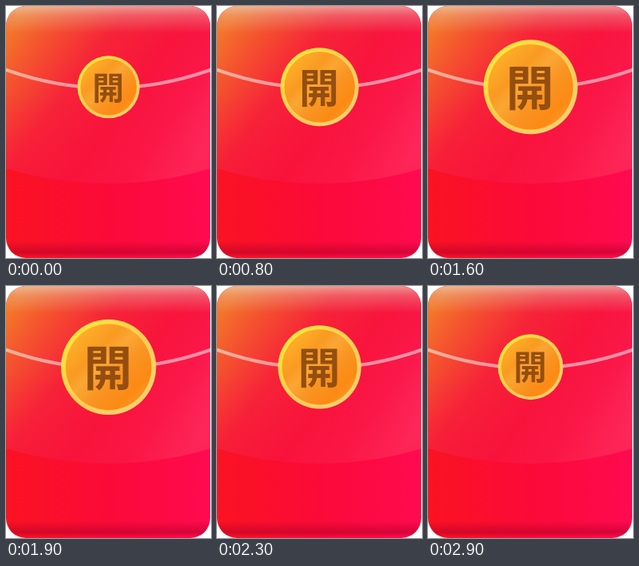
An HTML page for the animation above (3000 ms loop, 257 by 315 pixels).

```html
<!DOCTYPE html>
<html lang="zh-Hant">
<head>
<meta charset="utf-8">
<style>
  html, body { margin: 0; width: 100%; height: 100%; overflow: hidden; background: #fff; }
  svg { display: block; width: 257px; height: 315px; }
  text { font: bold 63px "Noto Sans CJK TC", "Noto Sans CJK JP", "Noto Sans CJK", sans-serif; }
</style>
</head>
<body>
<svg viewBox="0 0 257 315">
  <defs>
    <clipPath id="card"><rect width="256" height="315" rx="25"/></clipPath>
    <path id="flapShape" d="M0 0H257V203Q128.5 241 0 203Z"/>
    <linearGradient id="body">
      <stop stop-color="#fa1322"/>
      <stop offset=".5" stop-color="#fb0a38"/>
      <stop offset="1" stop-color="#ff0a50"/>
    </linearGradient>
    <linearGradient id="flap" gradientUnits="userSpaceOnUse" x1="0" y1="36" x2="230" y2="206">
      <stop stop-color="#f4762a"/>
      <stop offset=".14" stop-color="#f4542e"/>
      <stop offset=".36" stop-color="#f62438"/>
      <stop offset=".6" stop-color="#f8143c"/>
      <stop offset=".8" stop-color="#fb184a"/>
      <stop offset="1" stop-color="#ff2c62"/>
    </linearGradient>
    <linearGradient id="fade" gradientUnits="userSpaceOnUse" x1="0" y1="110" x2="0" y2="222">
      <stop stop-color="#fa1038" stop-opacity="0"/>
      <stop offset="1" stop-color="#fa1038" stop-opacity=".35"/>
    </linearGradient>
    <linearGradient id="top" x2="0" y2="1">
      <stop stop-color="#e8d8c4" stop-opacity=".65"/>
      <stop offset=".35" stop-color="#e8d0bc" stop-opacity=".32"/>
      <stop offset="1" stop-color="#e8c8b4" stop-opacity="0"/>
    </linearGradient>
    <linearGradient id="bottom" x2="0" y2="1">
      <stop stop-color="#b00028" stop-opacity="0"/>
      <stop offset=".7" stop-color="#b00028" stop-opacity=".55"/>
      <stop offset="1" stop-color="#b00028" stop-opacity="0"/>
    </linearGradient>
    <linearGradient id="rim" x2="1" y2="1">
      <stop offset=".12" stop-color="#ffe63c"/>
      <stop offset=".5" stop-color="#ffcc50"/>
      <stop offset=".9" stop-color="#fcd070"/>
    </linearGradient>
    <linearGradient id="face" x2="1" y2="1">
      <stop offset=".12" stop-color="#ffb028"/>
      <stop offset=".34" stop-color="#f99a22"/>
      <stop offset=".45" stop-color="#fba634"/>
      <stop offset=".6" stop-color="#f99422"/>
      <stop offset=".78" stop-color="#fc8a14"/>
      <stop offset=".92" stop-color="#fa9c28"/>
    </linearGradient>
  </defs>
  <g clip-path="url(#card)">
    <rect width="257" height="315" fill="url(#body)"/>
    <use href="#flapShape" fill="url(#flap)"/>
    <use href="#flapShape" fill="url(#fade)"/>
    <rect width="257" height="34" fill="url(#top)"/>
    <rect y="294" width="257" height="20" fill="url(#bottom)"/>
    <path d="M-2 79Q128.5 126 259 79" fill="none" stroke="#fff" stroke-opacity=".52" stroke-width="4.2"/>
  </g>
  <g id="coin">
    <circle r="62" fill="url(#rim)"/>
    <circle r="56" fill="url(#face)"/>
    <text x="-.8" y="24.4" text-anchor="middle" fill="#944e10">開</text>
  </g>
</svg>
<script>
  const coin = document.getElementById('coin');
  const LOOP = 3000, PEAK = 1800, STEP = 100;
  const MIN = 0.63, MAX = 0.992;

  function draw() {
    const t = Math.floor(performance.now() % LOOP / STEP) * STEP;
    const grow = t < PEAK ? t / PEAK : (LOOP - t) / (LOOP - PEAK);
    const scale = MIN + (MAX - MIN) * grow;
    coin.setAttribute('transform', `translate(128.6 101.3) scale(${scale})`);
    requestAnimationFrame(draw);
  }
  draw();
</script>
</body>
</html>
```
